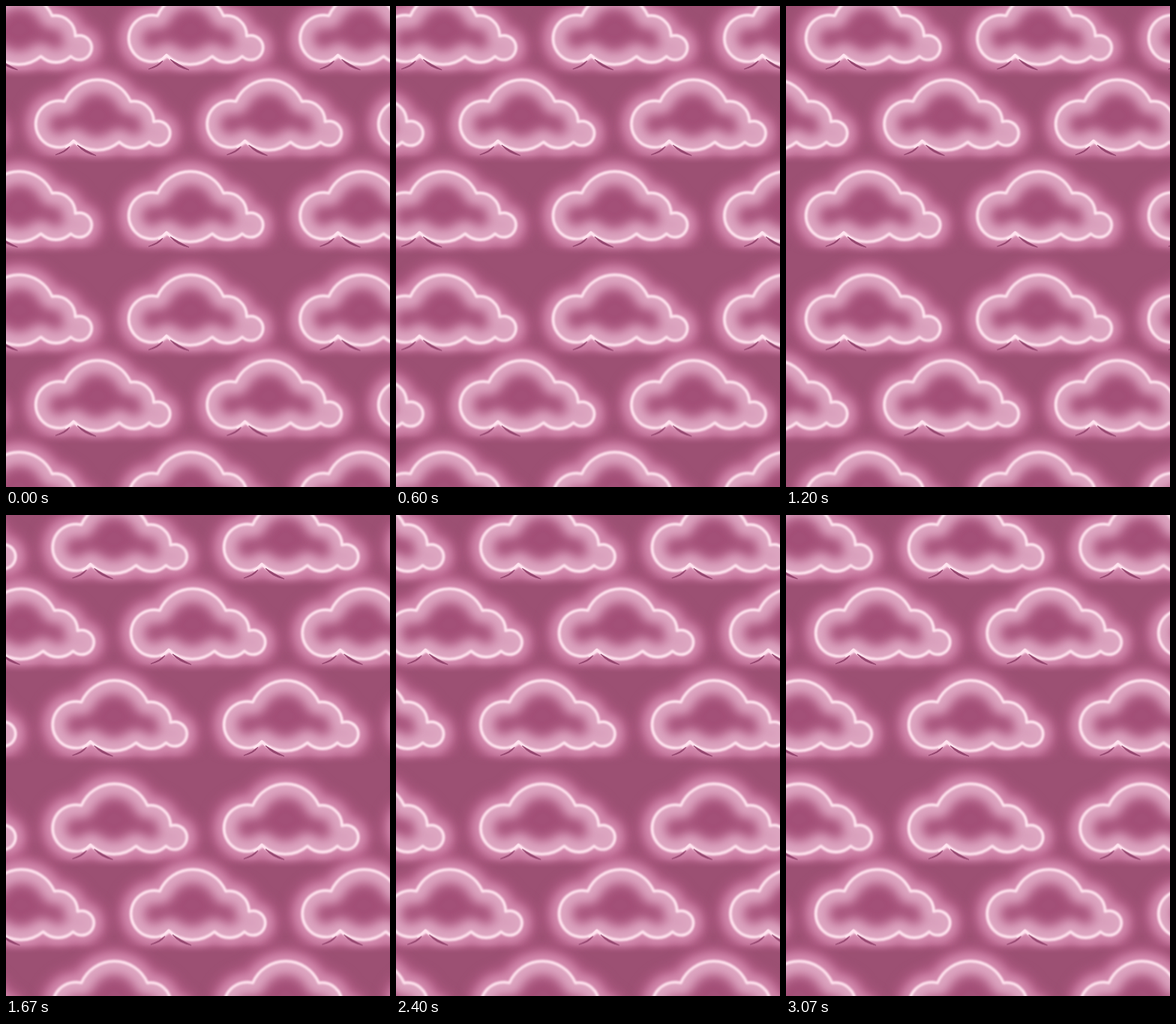
These frames come from a looping animation (512x640 px, 3190 ms). An HTML page with a canvas:

```html
<!DOCTYPE html>
<html>
<head>
<meta charset="utf-8">
<title>Neon clouds</title>
<style>
html, body { margin: 0; width: 100%; height: 100%; overflow: hidden; background: #9c5073; }
canvas { display: block; }
</style>
</head>
<body>
<canvas id="stage" width="512" height="640"></canvas>
<script>
const LOOP = 3190, STEPS = 45, FRAME = 200 / 3;
const GAP = 228.5, PAD = 50, BOTTOM = 114;
const TILE = 373.5; // three rows repeat at this height

const outline = new Path2D(`M40 31 A48 48 0 0 1 128 31 A27 27 0 0 1 159 58
  A16.3 16.3 0 1 1 153 85 A29 29 0 0 1 113 85 A46 46 0 0 1 53 84.5
  A31 31 0 1 1 40 31 Z`);
const peak = new Path2D('M41 92 Q47 89 52 83 Q57 89 64 92');
const pleat = new Path2D(`M28 102 Q39 98 47 91 Q42 99 28 102 Z
  M57 89 Q68 96 82 103 Q66 100 57 89 Z`);

function makeCloud() {
  const sprite = document.createElement('canvas');
  sprite.width = 290;
  sprite.height = PAD + BOTTOM;
  const c = sprite.getContext('2d');
  c.translate(PAD, PAD);
  c.lineJoin = 'round';

  function glow(width, blur, color, path = outline) {
    c.filter = `blur(${blur}px)`;
    c.lineWidth = width;
    c.strokeStyle = color;
    c.stroke(path);
  }

  c.fillStyle = 'rgba(176, 82, 128, .4)';
  c.fill(outline);
  glow(38, 8, 'rgba(190, 100, 144, .8)');
  glow(22, 6, 'rgba(222, 155, 188, .75)');
  c.save();
  c.clip(outline);
  glow(34, 8, 'rgba(224, 176, 201, .75)');
  c.restore();

  // the glow fades to a straight edge below the cloud
  const fade = c.createLinearGradient(0, BOTTOM - 12, 0, BOTTOM);
  fade.addColorStop(0, 'rgba(0, 0, 0, 0)');
  fade.addColorStop(1, '#000');
  c.filter = 'none';
  c.globalCompositeOperation = 'destination-out';
  c.fillStyle = fade;
  c.fillRect(-PAD, BOTTOM - 12, sprite.width, 12);
  c.globalCompositeOperation = 'source-over';

  glow(3.8, 0.8, '#ffe4ef');
  glow(3, 0.7, '#ffe4ef', peak);
  glow(1, 0.5, '#94466f', pleat);
  c.fillStyle = '#94466f';
  c.fill(pleat);
  return sprite;
}

const ctx = document.getElementById('stage').getContext('2d');
const cloud = makeCloud();

function stepAt(time) {
  const step = Math.floor((Math.floor(time / 10) * 10 + 4) / FRAME);
  // one step is held twice as long
  return Math.min(step > 33 ? step - 1 : step, STEPS);
}

function drawRow(left, top) {
  for (let x = left - 2 * GAP; x < 512 + PAD; x += GAP) {
    ctx.drawImage(cloud, x - PAD, top - PAD);
  }
}

function draw(now) {
  const shift = stepAt(now % LOOP) * GAP / STEPS;
  ctx.fillStyle = '#9c5073';
  ctx.fillRect(0, 0, 512, 640);
  for (let top = -18; top < 640; top += TILE) {
    drawRow(162 + shift, top);
    drawRow(38 + shift, top + 114);
    drawRow(162 + shift, top + 236);
  }
  requestAnimationFrame(() => draw(performance.now()));
}
draw(0);
</script>
</body>
</html>
```
